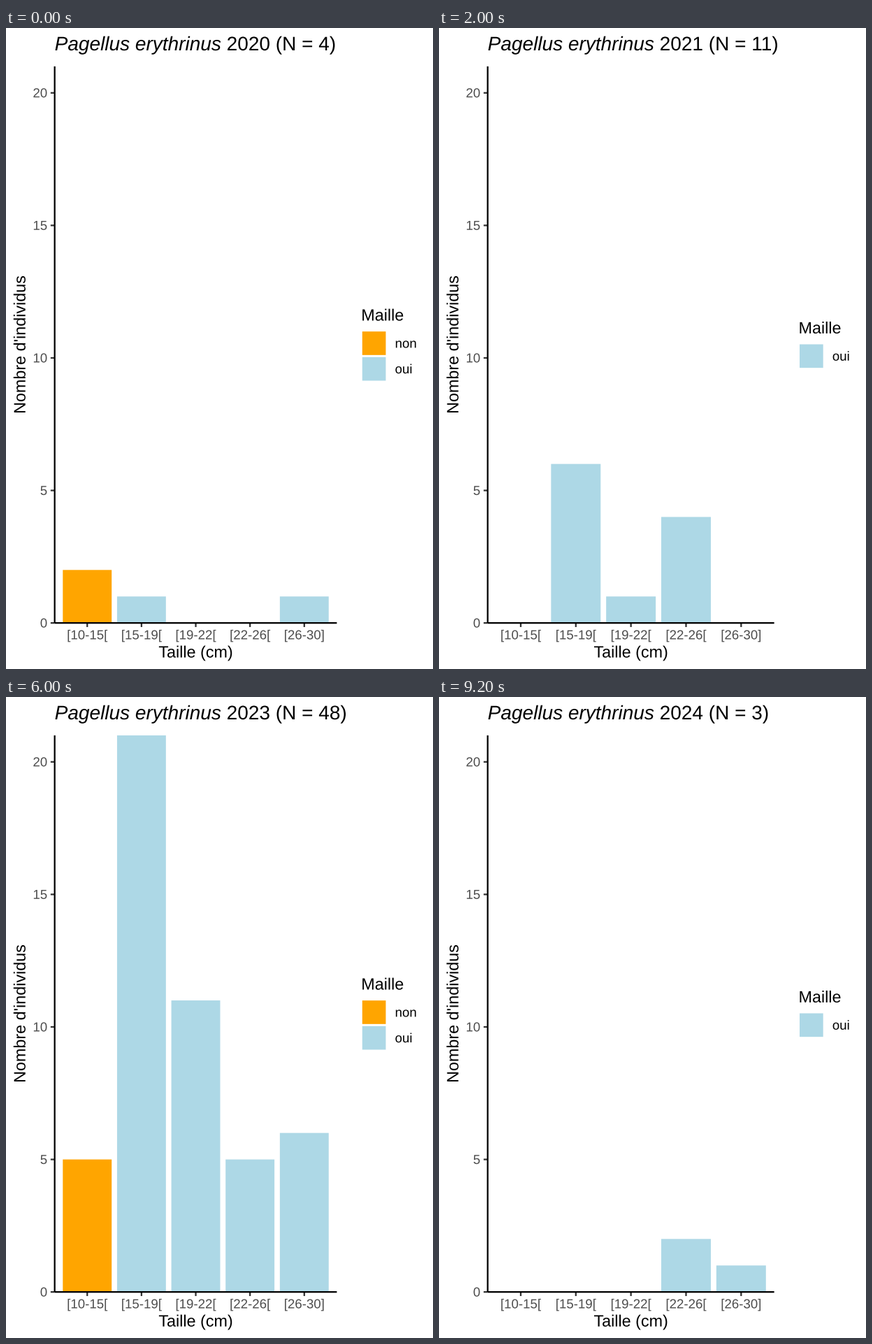
A matplotlib script that plays this animation: 611x917 px, repeating every 10 s.

```python
import matplotlib.pyplot as plt
from matplotlib.animation import FuncAnimation
from matplotlib.patches import PathPatch, Rectangle
from matplotlib.textpath import TextPath
from matplotlib.transforms import Affine2D

W, H = 611, 917
DPI = 152.8                       # layout resolution of the 4 x 6 inch chart
PT = DPI / 72.27
BASE, SMALL, BIG = (s * DPI / 72 for s in (11, 8.8, 13.2))
CAP, LINE = 0.688, 0.9            # cap height and line height, in em
GAP = 5.5 * PT
TICK = 2.75 * PT
STROKE = 1.4226 * DPI / 96
KEY = 17.28 * DPI / 72
INSET = 0.25 * DPI / 25.4

LEFT, TOP, BOTTOM = 69.65, 54.9, 851.15
MIDDLE = (TOP + BOTTOM) / 2
UNIT = (BOTTOM - TOP) / 21

COLORS = {"non": "#FFA500", "oui": "#ADD8E6"}
CLASSES = ["[10-15[", "[15-19[", "[19-22[", "[22-26[", "[26-30]"]
COUNTS = {
    2020: [2, 1, 0, 0, 1],
    2021: [0, 6, 1, 4, 0],
    2022: [7, 0, 12, 2, 0],
    2023: [5, 21, 11, 5, 6],
    2024: [0, 0, 0, 2, 1],
}
YEARS = list(COUNTS)

fig = plt.figure(figsize=(W / 64, H / 64), dpi=64, facecolor="white")
ax = fig.add_axes([0, 0, 1, 1])
ax.set(xlim=(0, W), ylim=(0, H))
ax.axis("off")


def glyphs(s, size, style="normal"):
    return TextPath((0, 0), s, size=size,
                    prop={"family": "Liberation Sans", "style": style})


def advance(s, size, style="normal"):
    """Pen advance of a string, including side bearings."""
    end = glyphs(s + "l", size, style).get_extents().x1
    return end - glyphs("l", size, style).get_extents().x1


def text(x, y, s, size, color="black", align=0.0, rot=0, style="normal"):
    """Draw text with its baseline at y, measured from the top."""
    shift = -align * advance(s, size, style) if align else 0
    place = Affine2D().translate(shift, 0).rotate_deg(rot).translate(x, H - y)
    ax.add_patch(PathPatch(glyphs(s, size, style), fc=color, lw=0, snap=False,
                           transform=place + ax.transData))


def box(x0, y0, x1, y1, color):
    ax.add_patch(Rectangle((x0, H - y1), x1 - x0, y1 - y0,
                           fc=color, lw=0, snap=False))


def hline(x0, x1, y, color):
    box(x0, y - STROKE / 2, x1, y + STROKE / 2, color)


def vline(x, y0, y1, color):
    box(x - STROKE / 2, y0, x + STROKE / 2, y1, color)


def draw_title(year, total):
    species = "Pagellus erythrinus "
    text(LEFT, 32, species, BIG, style="italic")
    text(LEFT + advance(species, BIG, "italic"), 32,
         f"{year} (N = {total})", BIG)


def draw_legend(labels):
    """Draw the legend and return its left edge."""
    label_x = W - 2 * GAP - max(advance(s, SMALL) for s in labels)
    left = label_x - GAP - KEY
    head = LINE * BASE
    top = MIDDLE - (head + GAP + KEY * len(labels)) / 2
    text(left, top + head / 2 + CAP * BASE / 2, "Maille", BASE)
    for i, s in enumerate(labels):
        y = top + head + GAP + i * KEY
        box(left + INSET, y + INSET, left + KEY - INSET, y + KEY - INSET,
            COLORS[s])
        text(label_x, y + KEY / 2 + CAP * SMALL / 2, s, SMALL)
    return left


def draw_axes(right, centers):
    label_gap = TICK + 2.2 * PT
    for v in range(0, 21, 5):
        y = BOTTOM - v * UNIT
        hline(LEFT - TICK, LEFT, y, "#333333")
        text(LEFT - label_gap, y + CAP * SMALL / 2, str(v), SMALL,
             "#4D4D4D", align=1)
    for x, s in zip(centers, CLASSES):
        vline(x, BOTTOM, BOTTOM + TICK, "#333333")
        text(x, BOTTOM + label_gap + CAP * SMALL, s, SMALL,
             "#4D4D4D", align=0.5)
    vline(LEFT, TOP, BOTTOM, "black")
    hline(LEFT, right, BOTTOM, "black")
    text((LEFT + right) / 2, 900.5, "Taille (cm)", BASE, align=0.5)
    text(GAP + CAP * BASE, MIDDLE, "Nombre d'individus", BASE,
         align=0.5, rot=90)


def update(i):
    for p in list(ax.patches):
        p.remove()
    year = YEARS[i % len(YEARS)]
    counts = COUNTS[year]
    draw_title(year, sum(counts))

    right = draw_legend(["non", "oui"] if counts[0] else ["oui"]) - 3 * GAP
    step = (right - LEFT) / 5.2
    centers = [LEFT + (0.6 + k) * step for k in range(5)]
    for k, (x, n) in enumerate(zip(centers, counts)):
        if n:
            box(x - 0.45 * step, BOTTOM - n * UNIT, x + 0.45 * step, BOTTOM,
                COLORS["oui" if k else "non"])
    draw_axes(right, centers)
    return ax.patches


anim = FuncAnimation(fig, update, frames=len(YEARS), interval=2000, repeat=True)
plt.show()
```
